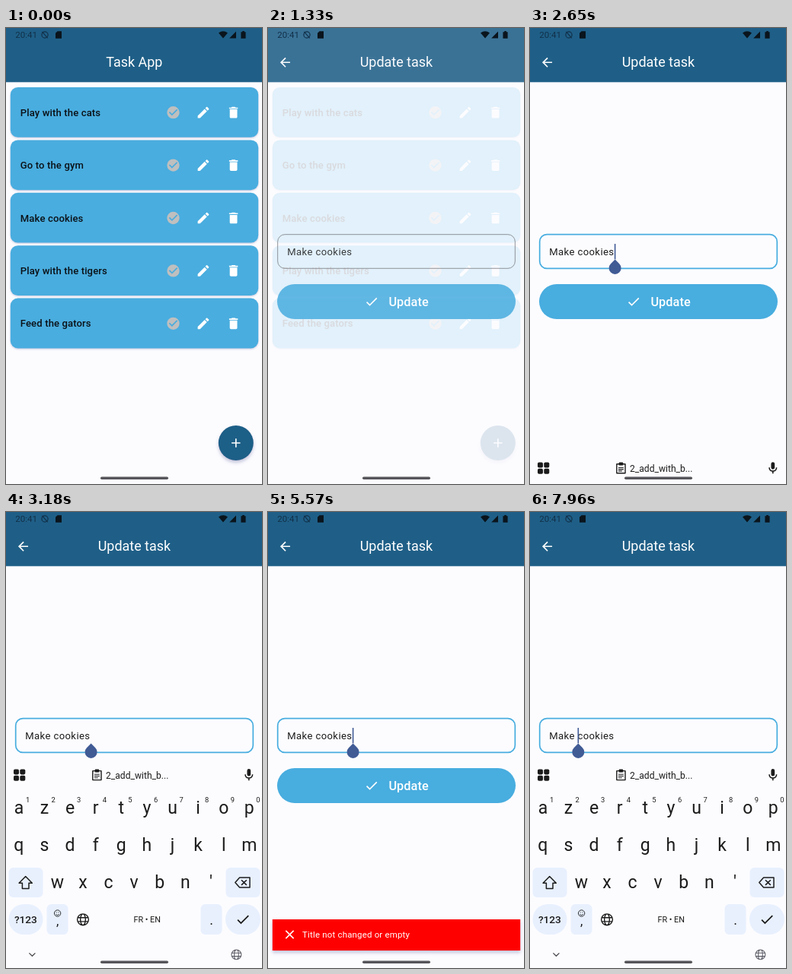
Write an HTML page that moves like this. It is 336 px wide and 600 px high and loops after 8 s.

```html
<!DOCTYPE html>
<html lang="en">
<head>
<meta charset="utf-8">
<title>Task list</title>
<style>
  html, body { margin: 0; width: 100%; height: 100%; overflow: hidden; background: #fcfcff; }
  svg { display: block; width: 100%; height: 100%; }
  text { font-family: Roboto, "Noto Sans", sans-serif; white-space: pre; }
</style>
</head>
<body>
<svg id="stage" viewBox="0 0 336 600"></svg>
<script>
const LOOP = 8000;
const BG = '#fcfcff', NAVY = '#1f5f87', SKY = '#48addf', INDIGO = '#415b95', INK = '#1b1b1b', KEY = '#e8f0fe';
const TASKS = ['Play with the cats', 'Go to the gym', 'Make cookies', 'Play with the tigers', 'Feed the gators'];

// Icon outlines on a 24 unit grid
const ICONS = {
  done: 'M12 2a10 10 0 1 0 0 20 10 10 0 0 0 0-20zm-2 15l-5-5 1.41-1.41L10 14.17l7.59-7.59L19 8z',
  edit: 'M3 17.25V21h3.75L17.81 9.94l-3.75-3.75zM20.71 7.04c.39-.39.39-1.02 0-1.41l-2.34-2.34c-.39-.39-1.02-.39-1.41 0l-1.83 1.83 3.75 3.75z',
  bin: 'M6 19c0 1.1.9 2 2 2h8c1.1 0 2-.9 2-2V7H6zM19 4h-3.5l-1-1h-5l-1 1H5v2h14z',
  plus: 'M19 13h-6v6h-2v-6H5v-2h6V5h2v6h6z',
  back: 'M20 11H7.83l5.59-5.59L12 4l-8 8 8 8 1.41-1.41L7.83 13H20z',
  check: 'M9 16.17L4.83 12l-1.42 1.41L9 19 21 7l-1.41-1.41z',
  close: 'M19 6.41L17.59 5 12 10.59 6.41 5 5 6.41 10.59 12 5 17.59 6.41 19 12 13.41 17.59 19 19 17.59 13.41 12z',
  mic: 'M12 14a3 3 0 0 0 3-3V5a3 3 0 0 0-6 0v6a3 3 0 0 0 3 3zm5-3a5 5 0 0 1-10 0H5a7 7 0 0 0 6 6.92V21h2v-3.08A7 7 0 0 0 19 11z'
};

const icon = (name, x, y, fill = '#fff', size = 19.6) =>
  `<path d="${ICONS[name]}" fill="${fill}" fill-rule="evenodd" transform="translate(${x} ${y}) scale(${size / 24}) translate(-12 -12)"/>`;
const rect = (x, y, w, h, r, fill, extra = '') =>
  `<rect x="${x}" y="${y}" width="${w}" height="${h}" rx="${r}" fill="${fill}" ${extra}/>`;
const text = (s, x, y, size, fill = INK, extra = '') =>
  `<text x="${x}" y="${y}" font-size="${size}" fill="${fill}" ${extra}>${s}</text>`;
const mid = (s, x, y, size, fill, extra = '') => text(s, x, y, size, fill, 'text-anchor="middle" ' + extra);
const line = (d, width = 1.4, color = INK) =>
  `<path d="${d}" fill="none" stroke="${color}" stroke-width="${width}" stroke-linejoin="round"/>`;
const globe = (x, y, r, color, width) =>
  `<g transform="translate(${x} ${y}) scale(${r / 8})">` + line(
    'M-8 0a8 8 0 1 0 16 0a8 8 0 1 0-16 0M-3.6 0a3.6 8 0 1 0 7.2 0a3.6 8 0 1 0-7.2 0M-7.4-2.8H7.4M-7.4 2.8H7.4',
    width, color) + '</g>';
const header = title => rect(0, 0, 336, 71.3, 0, NAVY) + mid(title, 168.4, 51.4, 17.95, '#fff');

function listPage() {
  const cards = TASKS.map((task, i) => {
    const y = 78 + i * 69.4, cy = y + 33.2;
    return rect(5.8, y, 325.4, 65.8, 9.8, SKY, 'filter="url(#soft)"') +
      text(task, 18.8, cy + 4.5, 13.07, '#0b1117', 'font-weight="500" letter-spacing=".13"') +
      icon('done', 219.5, cy, '#bfbfbf') + icon('edit', 259, cy) + icon('bin', 298.6, cy);
  }).join('');
  return header('Task App') + cards +
    `<circle cx="301.8" cy="546" r="23" fill="${NAVY}" filter="url(#glow)"/>` + icon('plus', 301.8, 546);
}

function editPage() {
  return header('Update task') + icon('back', 22.5, 45.3) +
    rect(12.7, 271.7, 311.6, 44.6, 9.4, 'none', 'id="field"') +
    text('Make cookies', 25.2, 298.6, 13.07, INK, 'letter-spacing=".41"') +
    rect(12, 337, 313, 46, 23, SKY) + icon('check', 136, 360) +
    text('Update', 158.4, 365.8, 16.3, '#fff', 'font-weight="500" letter-spacing=".08"') +
    `<g id="caret">${rect(-0.8, 284, 1.6, 20.4, 0, INDIGO)}</g>` +
    `<path id="grip" d="M0 304.6L5.66 310.3A8 8 0 1 1-5.66 310.3Z" fill="${INDIGO}"/>`;
}

function keyboard() {
  const col = i => 16.9 + i * 33.6;
  const key = (s, x, y) => mid(s, x, y, 23, INK);
  const row = (s, y, first) => [...s].map((c, i) => key(c, col(i + first), y)).join('');
  const digits = [...'1234567890'].map((d, i) => mid(d, col(i) + 11.6, 381.6, 9.3, INK)).join('');
  const grid = [0, 1, 2, 3].map(i => rect(10 + (i % 2) * 8.3, 338.4 + (i >> 1) * 8.3, 7, 7, 1.8, INK)).join('');
  const clip = line('M113.8 340.6H125V352.6H113.8Z') + rect(116.6, 338.4, 5.6, 4, 1, INK) +
    line('M116 345.3H122.8M116 347.5H122.8M116 349.7H120.8', 1.1);
  return rect(0, 326, 336, 274, 0, BG) + grid + clip +
    text('2_add_with_b...', 131, 350.6, 12.1) + icon('mic', 318.8, 346, INK, 19) +
    row('azertyuiop', 397, 0) + digits + row('qsdfghjklm', 446, 0) +
    rect(3.5, 468, 45, 39, 6, KEY) + row("wxcvbn'", 495, 1.5) + rect(288.5, 468, 45, 39, 6, KEY) +
    line('M25.7 479.5L34.3 488.2H30V495.6H21.4V488.2H17.1Z', 1.5) +
    line('M306.6 481H320V494H306.6L300.8 487.5ZM309 484.2L315.8 490.9M315.8 484.2L309 490.9', 1.5) +
    rect(3.5, 516, 45, 40, 20, KEY) + mid('?123', 25.9, 541, 13.7, INK, 'font-weight="500"') +
    rect(53.5, 516, 28, 40, 6, KEY) + mid(',', 67.6, 544, 17, INK) +
    line('M63.4 528a4.2 4.2 0 1 0 8.4 0a4.2 4.2 0 1 0-8.4 0M65.4 529.3Q67.6 531.8 69.8 529.3M65.7 526.8h1M68.5 526.8h1', 0.9) +
    globe(101, 536.3, 7.4, INK, 1.5) +
    mid('FR • EN', 185.2, 540, 10.8, INK) +
    rect(255.5, 516, 28, 40, 6, KEY) + mid('.', 269.5, 542.5, 18, INK) +
    rect(288, 516, 46, 40, 20, KEY) + icon('check', 311, 536, INK, 21) +
    line('M30.4 580.4L34.4 584.2L38.4 580.4', 1.3, '#46464c') + globe(302.4, 582.4, 6.4, '#5c5c66', 1.3);
}

function snackbar() {
  return rect(5.8, 536, 325.4, 41, 0, '#f00', 'filter="url(#glow)"') + icon('close', 28.5, 556) +
    text('Title not changed or empty', 45, 560, 11.44, '#fff', 'letter-spacing=".2"');
}

function statusBar() {
  const dark = '#0a141c', dim = '#123049';
  return text('20:41', 12.3, 13.2, 11.5, dim) +
    line('M46.9 9a4.1 4.1 0 1 0 8.2 0a4.1 4.1 0 1 0-8.2 0M47.4 4.8L54.8 13.4', 1.2, dim) +
    `<path fill="${dark}" d="M67.6 4.2H73V13.8H65V6.8ZM279 6.4Q285 2 291 6.4L285 13.6ZM293.2 13.4H302V4.6ZM308.4 5.2H310.2V4H312.8V5.2H314.6V13.8H308.4Z"/>`;
}

const shadow = (id, dy, blur) =>
  `<filter id="${id}" x="-20%" y="-30%" width="140%" height="170%"><feDropShadow dx="0" dy="${dy}" stdDeviation="${blur}" flood-color="#8484b4" flood-opacity=".45"/></filter>`;

document.getElementById('stage').innerHTML =
  `<defs>${shadow('soft', 1, 1)}${shadow('glow', 3, 2)}</defs>` +
  rect(0, 0, 336, 600, 0, BG) +
  `<g id="list">${listPage()}</g><g id="edit">${editPage()}</g>` +
  `<g id="snack">${snackbar()}</g><g id="keys">${keyboard()}</g>` +
  statusBar() + rect(124, 590.6, 89, 3.4, 1.7, '#55555a');

const part = {};
for (const id of ['list', 'edit', 'field', 'caret', 'grip', 'snack', 'keys']) part[id] = document.getElementById(id);

// Fast-out, slow-in curve: cubic Bézier (.4, 0, .2, 1)
function ease(x) {
  let lo = 0, hi = 1, s = x;
  for (let i = 0; i < 18; i++) {
    s = (lo + hi) / 2;
    const bx = 1.2 * s * (1 - s) ** 2 + 0.6 * s * s * (1 - s) + s ** 3;
    if (bx < x) lo = s; else hi = s;
  }
  return s * s * (3 - 2 * s);
}
const ramp = (t, from, to) => ease(Math.min(1, Math.max(0, (t - from) / (to - from))));

const FOCUS = 2220, JUMP = 7630;
const CARET_ON = [[FOCUS, 2710], [3250, 3710], [4210, 4710], [5240, 6630], [7130, LOOP]];

function draw(t) {
  const fade = ramp(t, 1155, 1460);
  part.list.setAttribute('opacity', 1 - fade);
  part.edit.setAttribute('opacity', fade);

  const focus = ramp(t, FOCUS, FOCUS + 150);
  part.field.setAttribute('stroke', focus > 0.3 ? SKY : '#74757c');
  part.field.setAttribute('stroke-width', 0.9 + 0.8 * focus);

  const x = t < JUMP ? 111.6 : 63.3;
  const on = CARET_ON.some(([a, b]) => t >= a && t < b);
  part.caret.setAttribute('transform', `translate(${x} 0)`);
  part.grip.setAttribute('transform', `translate(${x} 0)`);
  part.caret.setAttribute('opacity', on ? 1 : 0);
  part.grip.setAttribute('opacity', t >= FOCUS ? 1 : 0);

  const pop = ramp(t, 4150, 4330), size = 0.8 + 0.2 * pop;
  part.snack.setAttribute('opacity', t < 6300 ? pop : 0);
  part.snack.setAttribute('transform', `translate(168.5 556.5) scale(${size}) translate(-168.5 -556.5)`);

  const up = ramp(t, 2590, 2880) - ramp(t, 3710, 3950) + ramp(t, 5840, 6130);
  part.keys.setAttribute('transform', `translate(0 ${275 * (1 - up)})`);
}

const start = performance.now();
function tick() {
  draw((performance.now() - start) % LOOP);
  requestAnimationFrame(tick);
}
tick();
</script>
</body>
</html>
```
